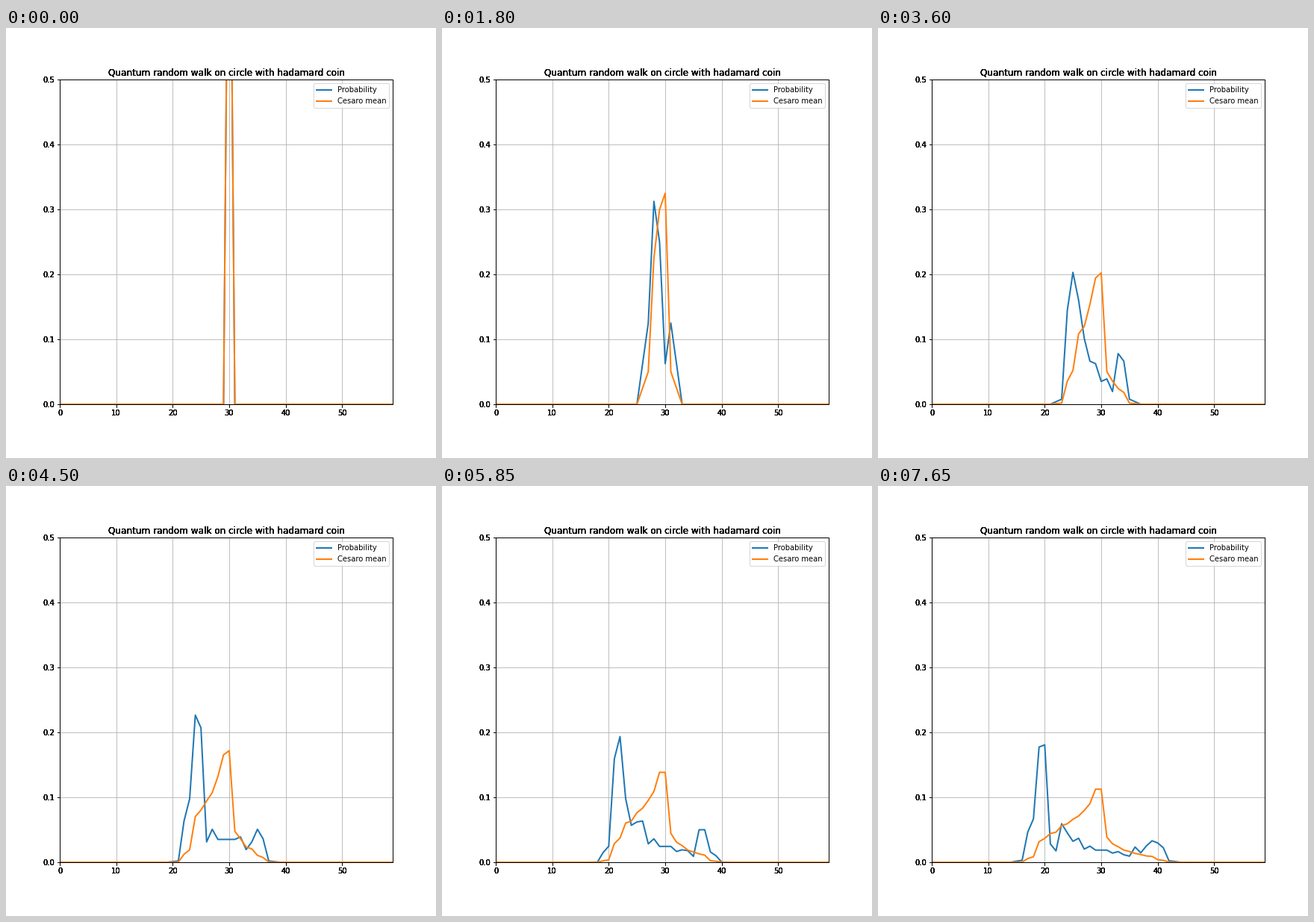
A matplotlib script that plays this animation: 576 px wide and 576 px high, repeating every 8000 ms.

```python
import numpy as np
import matplotlib.pyplot as plt
from matplotlib.animation import FuncAnimation

SITES = 60
STEPS = 18
TICK_MS = 50
STEP_MS = 450
LOOP_MS = 8000


def walk(steps):
    """Site probabilities of a Hadamard walk on a circle, one row per step."""
    left, right = np.zeros(SITES), np.zeros(SITES)
    left[SITES // 2] = 1
    rows = []
    for _ in range(steps):
        rows.append(left**2 + right**2)
        left, right = np.roll(left, -1), np.roll(right, 1)
        left, right = (left + right) / np.sqrt(2), (left - right) / np.sqrt(2)
    return np.array(rows)


def thicken(artist, times=5):
    """Draw an artist repeatedly so that its soft edges turn solid."""
    draw = artist.draw

    def repeat(renderer):
        for _ in range(times):
            draw(renderer)

    artist.draw = repeat


probs = walk(STEPS)
# The shown probability averages neighbouring steps to hide the parity gaps.
shown = probs.copy()
shown[1:] = (probs[1:] + probs[:-1]) / 2
means = np.cumsum(probs, axis=0) / np.arange(1, STEPS + 1)[:, None]

plt.rcParams["font.family"] = "DejaVu Sans"
fig = plt.figure(figsize=(8, 8), dpi=72, facecolor="white")
ax = fig.add_axes([0.125, 0.125, 0.775, 0.755])
ax.set_xlim(0, SITES - 1)
ax.set_ylim(0, 0.5)
ax.set_xticks(np.arange(0, SITES, 10))
ax.set_yticks(np.arange(6) / 10)
ax.grid(True)
ax.set_title("Quantum random walk on circle with hadamard coin")

x = np.arange(SITES)
prob_line, = ax.plot(x, shown[0], lw=2, color="tab:blue", label="Probability")
mean_line, = ax.plot(x, means[0], lw=2, color="tab:orange", label="Cesaro mean")
ax.legend(loc="upper right")

thicken(ax.title)
for tick in ax.xaxis.get_major_ticks() + ax.yaxis.get_major_ticks():
    thicken(tick.label1)
    thicken(tick.tick1line)
for spine in ax.spines.values():
    thicken(spine)


def update(frame):
    step = min(frame * TICK_MS // STEP_MS, STEPS - 1)
    prob_line.set_ydata(shown[step])
    mean_line.set_ydata(means[step])
    return prob_line, mean_line


anim = FuncAnimation(fig, update, frames=LOOP_MS // TICK_MS,
                     interval=TICK_MS, repeat=True, repeat_delay=0)
plt.show()
```
